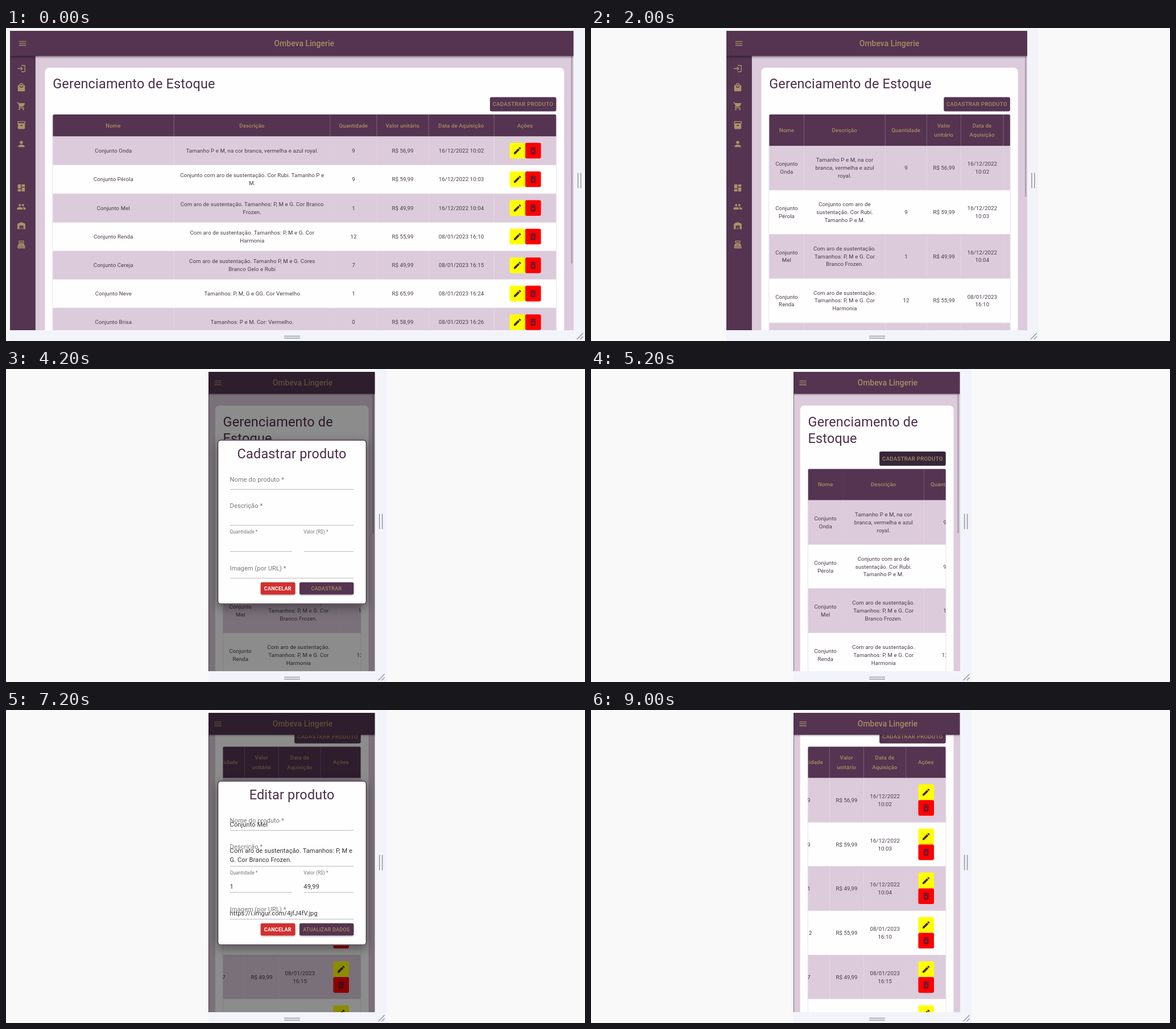
An HTML page that plays this animation: 1018 px wide and 550 px high, repeating every 9.6 s.

```html
<!DOCTYPE html>
<html lang="pt-BR">
<head>
<meta charset="utf-8">
<title>Gerenciamento de Estoque</title>
<style>
:root { --plum: #543451; --gold: #a98c62; --lilac: #dccbdb; --ink: #493c49; }
html, body { margin: 0; width: 100%; height: 100%; overflow: hidden; background: #f9f9f9; }
#stage { position: fixed; left: 0; top: 0; width: 1018px; height: 550px; overflow: hidden; background: #f9f9f9; }
#strip { position: absolute; top: 0; height: 550px; background: #f2f4fa; }
#strip::before { content: ""; position: absolute; left: 0; right: 20px; top: 0; height: 5px; background: #f9f9f9; }
#view { position: absolute; top: 5px; height: 526px; overflow: hidden; background: var(--lilac); }
#grips { position: absolute; left: 0; top: 0; width: 1018px; height: 550px; stroke: #999ca3; stroke-width: 1.6; fill: none; }

.page { position: absolute; left: 0; top: 0; height: 763px; transform: scale(.69); transform-origin: 0 0;
  overflow: hidden; background: var(--lilac); color: var(--ink); font: 400 14px/20px Roboto, sans-serif; letter-spacing: .01071em; }
.page svg { position: absolute; width: 24px; height: 24px; margin: -12px; fill: currentColor; fill-rule: evenodd; }
.bar { position: absolute; z-index: 3; left: 0; right: 0; top: 0; background: var(--plum); color: var(--gold);
  box-shadow: 0 2px 5px rgba(0, 0, 0, .45); text-align: center; font-weight: 500; font-size: 20px; letter-spacing: .0075em; }
.side { position: absolute; z-index: 2; left: 0; top: 0; bottom: 0; background: var(--plum); color: #ad9165; overflow: hidden; }
.thumb { position: absolute; z-index: 2; right: 3px; width: 3px; background: #a499a4; border-radius: 2px; }
.card { position: absolute; height: 1200px; background: #fefefe; border-radius: 10px; padding: 20px; box-sizing: border-box; }
h1 { margin: 0; font-weight: 400; font-size: 34px; line-height: 42px; letter-spacing: .00735em; color: #4b3049; white-space: nowrap; }
.btn { display: flex; align-items: center; justify-content: center; box-sizing: border-box; border-radius: 4px; background: var(--plum);
  color: var(--gold); font-weight: 500; letter-spacing: .02857em; white-space: nowrap; }
.new { width: 169px; height: 36px; margin: 13px 0 8px auto; }
.focus .new { background: #37263a; }
.grid { overflow: hidden; border-radius: 4px 4px 0 0; box-shadow: 0 0 0 1px #e2d6ea; }
table { table-layout: fixed; border-collapse: separate; border-spacing: 0; text-align: center; white-space: nowrap; }
th, td { padding: 0; overflow: hidden; box-sizing: border-box; }
th { background: var(--plum); color: var(--gold); font-weight: 500; line-height: 24px; border-right: 1px solid #80667a; }
th:last-child, .slim th:first-child { border-right: 0; }
td { border-bottom: 1px solid #e6dde6; }
tr:nth-child(odd) td { background: var(--lilac); }
.acts { display: flex; justify-content: center; }
.slim .acts { flex-direction: column; align-items: center; }
.acts i { position: relative; width: 40px; height: 40px; border-radius: 4px; background: #ff0; color: #40263a; }
.acts i + i { background: #f00; color: #611b31; }
.acts svg { left: 20px; top: 20px; }
.shade { position: absolute; z-index: 5; inset: 0; background: rgba(0, 0, 0, .45); }
.modal { position: absolute; left: 22.5px; top: 172.5px; width: 380px; height: 419px; background: #fefefe; border-radius: 8px;
  outline: 2px solid #3d2a3c; outline-offset: -2px; box-shadow: 0 8px 24px rgba(0, 0, 0, .4); }
.modal h1 { position: absolute; left: 0; right: 0; top: 14px; text-align: center; }
.modal p { position: absolute; margin: 0; transform: translateY(-50%); font-size: 16px; line-height: 23px; letter-spacing: .00938em; white-space: nowrap; color: #333; }
.modal p.label { color: #777; }
.modal p.small { font-size: 12px; }
.modal hr { position: absolute; margin: 0; border: 0; height: 1.4px; background: #a09aa4; }
.modal .btn { position: absolute; top: 363.5px; height: 31px; font-size: 13px; box-shadow: 0 2px 4px rgba(0, 0, 0, .35); }
.modal .cancel { left: 110px; width: 88px; background: #d32f2f; color: #fff; font-weight: 700; }
.modal .ok { left: 209px; width: 138px; }
</style>
</head>
<body>
<div id="stage">
  <div id="strip"></div>
  <div id="view"></div>
  <svg id="grips">
    <path d="M489 541.5h28M489 545h28"/>
    <path id="sideGrips" d="M8 254.500v27M13 254.500v27M6 547l11-11M12 547l5-5"/>
  </svg>
</div>
<script>
const SCALE = .69, CENTER = 502.4, LOOP = 9600, STEP = 200;
const $ = id => document.getElementById(id);

const icons = {
  menu: 'M3 18h18v-2H3zM3 13h18v-2H3zM3 6v2h18V6z',
  login: 'M11 7 9.600 8.400l2.600 2.600H2v2h10.200l-2.600 2.600L11 17l5-5zM20 19h-8v2h8c1.100 0 2-.9 2-2V5c0-1.100-.9-2-2-2h-8v2h8z',
  bag: 'M19 6h-2A5 5 0 0 0 7 6H5a2 2 0 0 0-2 2v12a2 2 0 0 0 2 2h14a2 2 0 0 0 2-2V8a2 2 0 0 0-2-2zM12 3a3 3 0 0 1 3 3H9a3 3 0 0 1 3-3zM12 13a5 5 0 0 1-5-5h2a3 3 0 0 0 6 0h2a5 5 0 0 1-5 5z',
  cart: 'M7 18a2 2 0 1 0 .01 0zM17 18a2 2 0 1 0 .01 0zM1 2v2h2l3.600 7.600L5.200 14c-.7 1.400.2 3 1.800 3h12v-2H7.400l-.2-.4.9-1.600h7.500c.7 0 1.400-.4 1.700-1l3.600-6.500c.3-.7-.1-1.500-.9-1.500H5.200l-.9-2z',
  box: 'M20 2H4a2 2 0 0 0-2 2v3c0 .7.4 1.300 1 1.700V20a2 2 0 0 0 2 2h14a2 2 0 0 0 2-2V8.700c.6-.4 1-1 1-1.700V4a2 2 0 0 0-2-2zM15 14H9v-2h6zM20 7H4V4h16z',
  person: 'M12 12a4 4 0 1 0 0-8 4 4 0 0 0 0 8zM12 14c-2.700 0-8 1.300-8 4v2h16v-2c0-2.700-5.300-4-8-4z',
  board: 'M3 13h8V3H3zM3 21h8v-6H3zM13 21h8V11h-8zM13 3v6h8V3z',
  people: 'M16 11a3 3 0 1 0 0-6 3 3 0 0 0 0 6zM8 11a3 3 0 1 0 0-6 3 3 0 0 0 0 6zM8 13c-2.300 0-7 1.200-7 3.500V19h14v-2.500C15 14.200 10.300 13 8 13zM16 13l-1 .1c1.200.8 2 1.900 2 3.400V19h6v-2.500c0-2.300-4.700-3.500-7-3.500z',
  depot: 'M22 21V8.400c0-.9-.5-1.600-1.300-1.900l-8-3.200a2 2 0 0 0-1.400 0l-8 3.200C2.500 6.800 2 7.500 2 8.400V21h5v-9h10v9zM11 19H9v2h2zM13 16h-2v2h2zM15 19h-2v2h2z',
  till: 'M17 2H7a2 2 0 0 0-2 2v2a2 2 0 0 0 2 2h10a2 2 0 0 0 2-2V4a2 2 0 0 0-2-2zM17 6H7V4h10zM20 22H4a2 2 0 0 1-2-2v-1h20v1a2 2 0 0 1-2 2zM18.500 10.200A2 2 0 0 0 16.700 9H7.300a2 2 0 0 0-1.800 1.200L2 18h20zM8 11h2v1H8zM11 11h2v1h-2zM14 11h2v1h-2zM8 14h2v1H8zM11 14h2v1h-2zM14 14h2v1h-2z',
  edit: 'M3 17.200V21h3.800L17.800 9.900l-3.700-3.700zM20.700 7c.4-.4.4-1 0-1.400l-2.300-2.300a1 1 0 0 0-1.400 0l-1.900 1.800 3.800 3.800z',
  trash: 'M6 19a2 2 0 0 0 2 2h8a2 2 0 0 0 2-2V7H6zM8.500 11.900l1.400-1.400 2.100 2.100 2.100-2.100 1.400 1.400-2.100 2.100 2.100 2.100-1.400 1.400-2.100-2.100-2.100 2.100-1.400-1.400 2.100-2.100zM15.500 4l-1-1h-5l-1 1H5v2h14V4z'
};
const icon = (name, x, y) =>
  `<svg viewBox="0 0 24 24" ${x ? `style="left:${x}px;top:${y}px"` : ''}><path d="${icons[name]}"/></svg>`;

// "~" breaks a line in slim tables, "|" in wide ones.
const heads = ['Nome', 'Descrição', 'Quantidade', 'Valor~unitário', 'Data de~Aquisição', 'Ações'];
const rows = [
  ['Onda', 'Tamanho P e M, na cor~branca, vermelha e azul~royal.', 9, '56,99', '16/12/2022~10:02'],
  ['Pérola', 'Conjunto com aro de~sustentação. Cor Rubi.~Tamanho P e|M.', 9, '59,99', '16/12/2022~10:03'],
  ['Mel', 'Com aro de sustentação.~Tamanhos: P, M e G. Cor~Branco|Frozen.', 1, '49,99', '16/12/2022~10:04'],
  ['Renda', 'Com aro de sustentação.~Tamanhos: P, M e G. Cor~|Harmonia', 12, '55,99', '08/01/2023~16:10'],
  ['Cereja', 'Com aro de sustentação.~Tamanho P, M e G. Cores~|Branco Gelo e Rubi', 7, '49,99', '08/01/2023~16:15'],
  ['Neve', 'Tamanhos: P, M, G e GG.~Cor Vermelho', 1, '65,99', '08/01/2023~16:24'],
  ['Brisa', 'Tamanhos: P e M. Cor:~Vermelho.', 0, '58,99', '08/01/2023~16:26']
];

const layouts = {
  wide: { width: 990.5, bar: 64, side: 65, gap: 24, menu: 32, thumb: 529, cols: [309, 398, 119, 131.5, 167, 158] },
  mid: { width: 529, bar: 64, side: 65, gap: 24, menu: 32, thumb: 358, slim: true },
  phone: { width: 292.5, bar: 56, side: 1, gap: 16, menu: 24, thumb: 355, slim: true, split: true }
};
const slimCols = [89, 207, 106, 87, 108, 101];

function tableHtml({ slim, cols = slimCols }) {
  const wrap = s => String(s).replace(/[~|]/g, c => (c === '~') === !!slim ? '<br>' : ' ');
  const cells = (tag, list, h) => `<tr style="height:${h}px">${list.map(s => `<${tag}>${wrap(s)}</${tag}>`).join('')}</tr>`;
  const acts = `<div class="acts"><i>${icon('edit')}</i><i>${icon('trash')}</i></div>`;
  const body = rows.map(([name, text, count, price, date]) =>
    cells('td', ['Conjunto~' + name, text, count, 'R$ ' + price, date, acts], slim ? 112.7 : 72.9));
  return `<table style="width:${cols.reduce((a, b) => a + b)}px"><colgroup>${cols.map(w => `<col style="width:${w}px">`).join('')}</colgroup>
    <thead>${cells('th', heads, slim ? 80 : 56)}</thead><tbody>${body.join('')}</tbody></table>`;
}

function sideHtml() {
  const names = ['login', 'bag', 'cart', 'box', 'person', 'board', 'people', 'depot', 'till'];
  return names.map((n, i) => icon(n, 29, 96 + i * 48 + (i > 4 ? 64 : 0))).join('');
}

function makePage(l) {
  const page = document.createElement('div');
  page.className = 'page' + (l.slim ? ' slim' : '');
  page.style.width = l.width / SCALE + 'px';
  page.innerHTML = `
    <div class="bar" style="height:${l.bar}px;line-height:${l.bar}px;padding-left:${l.split ? 56 : 64}px">${icon('menu', l.menu, l.bar / 2)}Ombeva Lingerie</div>
    <div class="side" style="width:${l.side}px">${sideHtml()}</div>
    <div class="thumb" style="top:${l.bar}px;height:${l.thumb}px"></div>
    <div class="card" style="left:${l.side + l.gap}px;right:${l.gap}px;top:${l.bar + 30}px">
      <h1>Gerenciamento de${l.split ? '<br>' : ' '}Estoque</h1>
      <div class="btn new">CADASTRAR PRODUTO</div>
      <div class="grid">${tableHtml(l)}</div>
    </div>`;
  $('view').append(page);
  return page;
}

function makeModal(title, action, [name, text, count, price, image]) {
  const p = (x, y, s, cls = '') => `<p class="${cls}" style="left:${x}px;top:${y}px">${s}</p>`;
  const line = (x, y, w) => `<hr style="left:${x}px;top:${y}px;width:${w}px">`;
  const shade = document.createElement('div');
  shade.className = 'shade';
  shade.innerHTML = `<div class="modal"><h1>${title}</h1>
    ${p(32, 101.5, 'Nome do produto *', 'label')}${p(32, 111, name)}${line(32, 126.5, 315)}
    ${p(32, 168.5, 'Descrição *', 'label')}${p(32, 189, text)}${line(32, 217, 315)}
    ${p(32, 235, 'Quantidade *', 'label small')}${p(32, 269.5, count)}${line(32, 284.5, 158)}
    ${p(220, 235, 'Valor (R$) *', 'label small')}${p(220, 269.5, price)}${line(220, 284.5, 127)}
    ${p(32, 327, 'Imagem (por URL) *', 'label')}${p(32, 338, image)}${line(32, 352.5, 315)}
    <div class="btn cancel">CANCELAR</div><div class="btn ok">${action}</div></div>`;
  pages.phone.append(shade);
  return shade;
}

const pages = {};
for (const key in layouts) pages[key] = makePage(layouts[key]);
const createModal = makeModal('Cadastrar produto', 'CADASTRAR', ['', '', '', '', '']);
const editModal = makeModal('Editar produto', 'ATUALIZAR DADOS',
  ['Conjunto Mel', 'Com aro de sustentação. Tamanhos: P, M e<br>G. Cor Branco Frozen.', '1', '49,99', 'https://i.imgur.com/4jfJ4fV.jpg']);
const card = pages.phone.querySelector('.card');
const table = pages.phone.querySelector('table');
const thumb = pages.phone.querySelector('.thumb');

// Linear interpolation through [time, value] points.
function track(t, points) {
  let [t0, v0] = points[0];
  for (const [t1, v1] of points) {
    if (t < t1) return t <= t0 ? v0 : v0 + (v1 - v0) * (t - t0) / (t1 - t0);
    [t0, v0] = [t1, v1];
  }
  return v0;
}

function fade(el, opacity) {
  el.style.opacity = opacity;
  el.style.display = opacity > 0 ? '' : 'none';
}

function draw(t) {
  const width = track(t, [[1000, 990.5], [1200, 705], [1600, 580], [2000, 529], [2200, 529], [2400, 495], [2800, 365], [3200, 292.5]]);
  const left = CENTER - width / 2, right = left + width;
  $('view').style.left = $('strip').style.left = left + 'px';
  $('view').style.width = width + 'px';
  $('strip').style.width = width + 20 + 'px';
  $('sideGrips').setAttribute('transform', `translate(${right})`);

  // The page reflows a little after the frame is dragged.
  const shown = t < 1800 ? 'wide' : t < 3000 ? 'mid' : 'phone';
  for (const key in pages) pages[key].style.display = key === shown ? '' : 'none';

  const scrollY = track(t, [[5200, 0], [5400, 45], [5600, 125], [5800, 161]]);
  const scrollX = track(t, [[5800, 0], [6000, 100], [6200, 270], [6400, 347]]);
  card.style.transform = `translateY(${-scrollY}px)`;
  table.style.transform = `translateX(${-scrollX}px)`;
  thumb.style.transform = `translateY(${scrollY / 2}px)`;
  thumb.style.display = t < 6400 ? '' : 'none';
  pages.phone.classList.toggle('focus', t >= 3600 && t < 6000);

  fade(createModal, track(t, [[3600, 0], [3800, .5], [4000, 1], [4600, 1], [4800, .6], [5000, 0]]));
  fade(editModal, track(t, [[6600, 0], [6800, .2], [7000, .8], [7200, 1], [8200, 1], [8400, .5], [8600, 0]]));
}

function tick(now) {
  draw(Math.floor(now % LOOP / STEP) * STEP);
  requestAnimationFrame(tick);
}
draw(0);
requestAnimationFrame(tick);
</script>
</body>
</html>
```
